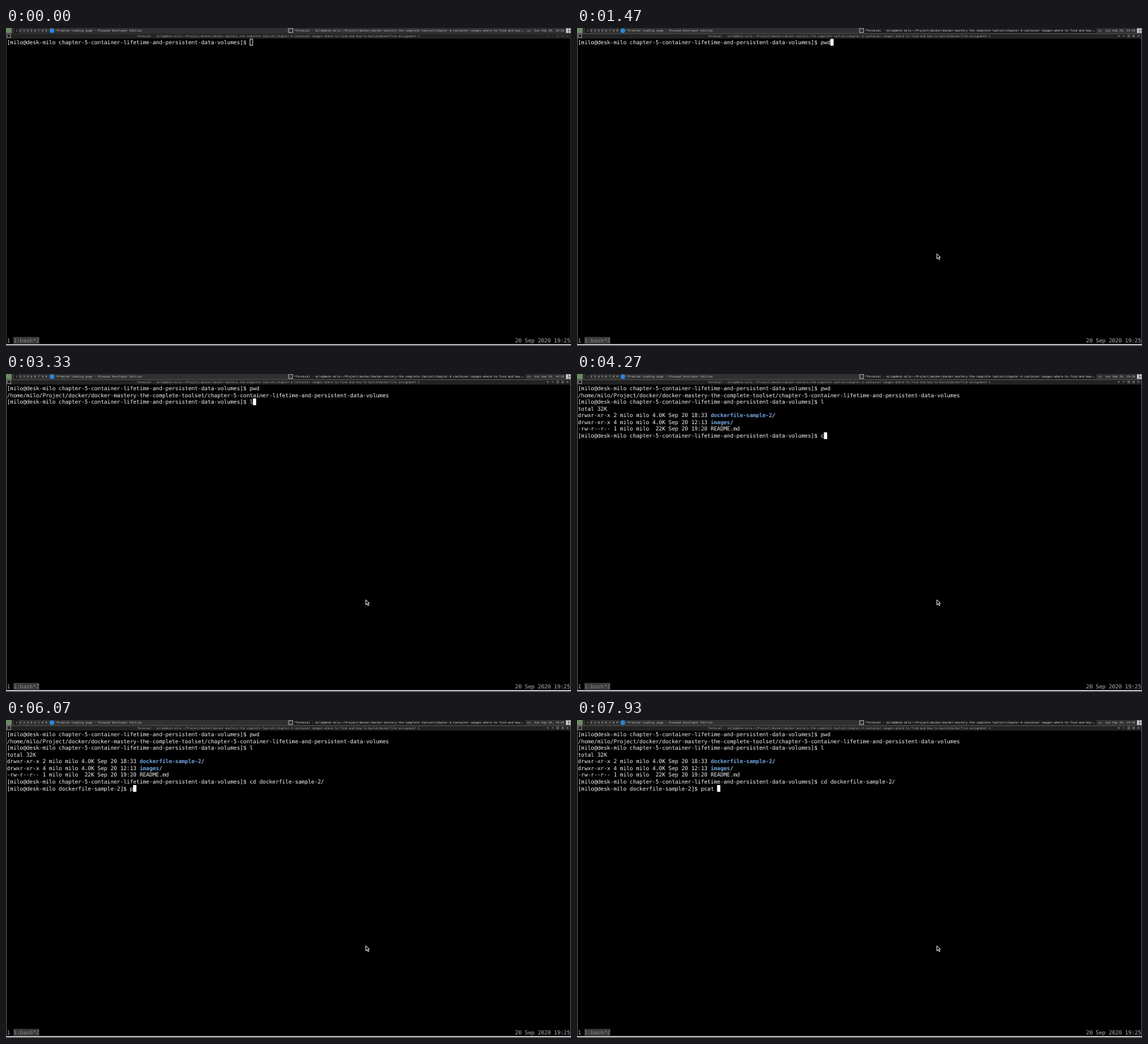
Recreate the animation shown at these times as an HTML page. Size 800 px wide and 450 px high, loop 8 s.

```html
<!DOCTYPE html>
<html lang="en">
<head>
<meta charset="utf-8">
<title>Terminal session</title>
<style>
  html, body { margin: 0; width: 100%; height: 100%; overflow: hidden; background: #000; }
  svg { display: block; width: 100vw; height: 100vh; }
  text { font-family: "DejaVu Sans Mono", "Liberation Mono", monospace; text-rendering: geometricPrecision; }
  .term text { font-size: 18.67px; fill: #f2f2f2; }
  .term .dir { font-weight: bold; fill: #6fa3dc; }
  .term .dim { fill: #858585; }
  .term .status { fill: #b4b4b4; }
  .bar text { font-size: 10px; fill: #bdbdbd; }
  .bar .title { fill: #a8a8a8; }
  .focused .task { fill: #1b1b1b; }
  .focused .taskname { fill: #e2e2e2; }
  .task { fill: #303030; }
  .buttons { opacity: .3; }
  .focused .buttons { opacity: 1; }
  .edge { fill: none; stroke: #3a3a3a; stroke-width: 2; }
  .focused .edge { stroke: #666; }
</style>
</head>
<body>
<svg id="stage" viewBox="0 0 1920 1080" preserveAspectRatio="none">
  <rect width="1920" height="1080"/>
  <g class="bar">
    <rect width="1920" height="18" fill="#303030"/>
    <rect y="18" width="1920" height="18" fill="#222"/>
    <rect width="19" height="18" fill="#6f8a66"/>
    <rect x="28" width="14" height="18" fill="#1b1b1b"/>
    <g id="tags"></g>
    <circle cx="156" cy="9" r="8" fill="#2c86dc"/>
    <rect class="task" x="957" width="808" height="18"/>
    <rect x="960" y="2" width="14" height="13" fill="#222" stroke="#ccc" stroke-width="2"/>
    <path d="M963 6l3 2.500-3 2.500" fill="none" stroke="#ccc"/>
    <g id="labels"></g>
    <rect x="1903" y="1" width="16" height="16" fill="#d0d0d0"/>
    <path d="M1911 1v16M1911 9h8" stroke="#555" stroke-width="2"/>
    <rect x="4" y="21" width="12" height="12" fill="#222" stroke="#999" stroke-width="2"/>
    <g class="buttons" fill="none" stroke="#aaa" stroke-width="1.500">
      <path d="M1838 27h6M1841 24v6M1855 29l3-4 3 4M1905 24l6 6M1911 24l-6 6"/>
      <rect x="1872" y="24" width="6" height="6"/>
      <rect x="1889" y="25" width="5" height="5"/>
    </g>
  </g>
  <rect class="edge" x="1" y="19" width="1918" height="1055"/>
  <rect y="1074" width="1920" height="4" fill="#d6d6d6"/>
  <g class="term">
    <rect x="25" y="1049" width="88" height="23" fill="#3a3a3a"/>
    <g id="status"></g>
    <g id="screen"></g>
    <rect id="cursor" width="11" height="23"/>
  </g>
  <path id="pointer" d="M0 0V17l4-4 3 7 3-1.500-3-6.500h5z" fill="#000" stroke="#fff" stroke-width="2"/>
</svg>
<script>
const LOOP = 8000, CELL = 11, ROW = 23, LEFT = 3, TOP = 37;
const $ = id => document.getElementById(id);

const who = 'milo@desk-milo';
const chapter = 'chapter-5-container-lifetime-and-persistent-data-volumes';
const sample = 'dockerfile-sample-2';
const course = 'Project/docker/docker-mastery-the-complete-toolset/';
const other = 'chapter-4-container-images-where-to-find-and-how-';
const A = `[${who} ${chapter}]$ `;
const B = `[${who} ${sample}]$ `;

// A text run placed on a fixed character grid.
function run(str, x, y, pitch, cls = '') {
  const xs = [...str].map((_, i) => x + i * pitch).join(' ');
  return `<text class="${cls}" x="${xs}" y="${y}">${str.replace(/ /g, '\u00a0')}</text>`;
}
const cells = (str, col, row, cls) =>
  str ? run(str, LEFT + col * CELL, TOP + 18 + row * ROW, CELL, cls) : '';
const label = (str, x, y, cls) => run(str, x, y, 6, cls);

// Directory names are marked with *asterisks*.
function line(str, row) {
  let col = 0;
  return str.split('*').map((part, i) => {
    const out = cells(part, col, row, i % 2 ? 'dir' : '');
    col += part.length;
    return out;
  }).join('');
}

const log = [
  A + 'pwd',
  `/home/milo/${course}${chapter}`,
  A + 'l',
  'total 32K',
  `drwxr-xr-x 2 milo milo 4.0K Sep 20 18:33 *${sample}*/`,
  'drwxr-xr-x 4 milo milo 4.0K Sep 20 12:13 *images*/',
  '-rw-r--r-- 1 milo milo  22K Sep 20 19:20 README.md',
  A + `cd ${sample}/`
];

// time, finished lines, line being typed
const steps = [
  [0, 0, A], [1270, 0, A + 'p'], [1330, 0, A + 'pw'], [1470, 0, A + 'pwd'],
  [1730, 1, ''], [1800, 2, A], [3330, 2, A + 'l'],
  [3600, 3, ''], [3670, 7, ''], [3730, 7, A],
  [4270, 7, A + 'c'], [4470, 7, A + 'cd'], [4600, 7, A + 'cd '], [4670, 7, A + 'cd d'],
  [4930, 7, A + 'cd do'], [5000, 7, A + 'cd doc'], [5130, 7, log[7]],
  [5400, 8, B], [6070, 8, B + 'p'], [6530, 8, B + 'pc'], [6730, 8, B + 'pca'],
  [7200, 8, B + 'pcat'], [7400, 8, B + 'pcat '], [7600, 8, B + 'pcat D'], [7930, 8, B + 'pcat ']
];

const FOCUS = 270, ACTIVE = 670;
const path = [[270, 1800, 740], [330, 1560, 750], [400, 1360, 760], [470, 1260, 765], [530, 1223, 767]];
const latest = (table, t) => table.filter(s => s[0] <= t).pop();

$('tags').innerHTML = [...'123456789'].map((n, i) => label(n, 33 + i * 12.6, 12.5)).join('');
$('labels').innerHTML =
  label('*Problem loading page - Pinwood Developer Edition', 168, 12.5) +
  label(`*Terminal - ${who}:~/${course}${other}…`, 979, 12.5, 'taskname') +
  label('us', 1771, 12.5) + label('Sun Sep 20, 19:25', 1795, 12.5) +
  label(`Terminal - ${who}:~/${course}${other}to-build/dockerfile-assignment-1`, 446, 31, 'title');
$('status').innerHTML = cells('1', 0, 44, 'status') + cells('1:bash*Z', 2, 44, 'dim') +
  cells('20 Sep 2020 19:25', 157, 44, 'status');

let shown;
function draw(t) {
  const step = latest(steps, t);
  const [, count, live] = step;
  if (step !== shown) {
    $('screen').innerHTML = [...log.slice(0, count), live].map(line).join('');
    shown = step;
  }
  const solid = t >= ACTIVE, cur = $('cursor'), inset = solid ? 0 : 1;
  cur.setAttribute('x', LEFT + live.length * CELL + inset);
  cur.setAttribute('y', TOP + count * ROW + inset);
  cur.setAttribute('width', CELL - 2 * inset);
  cur.setAttribute('height', ROW - 2 * inset);
  cur.setAttribute('fill', solid ? '#fff' : 'none');
  cur.setAttribute('stroke', solid ? 'none' : '#f0f0f0');
  cur.setAttribute('stroke-width', 2);

  $('stage').classList.toggle('focused', t >= FOCUS);
  const at = latest(path, t);
  $('pointer').setAttribute('visibility', at ? 'visible' : 'hidden');
  if (at) $('pointer').setAttribute('transform', `translate(${at[1]} ${at[2]})`);
}

const start = performance.now();
function tick() {
  draw((performance.now() - start) % LOOP);
  requestAnimationFrame(tick);
}
tick();
</script>
</body>
</html>
```
